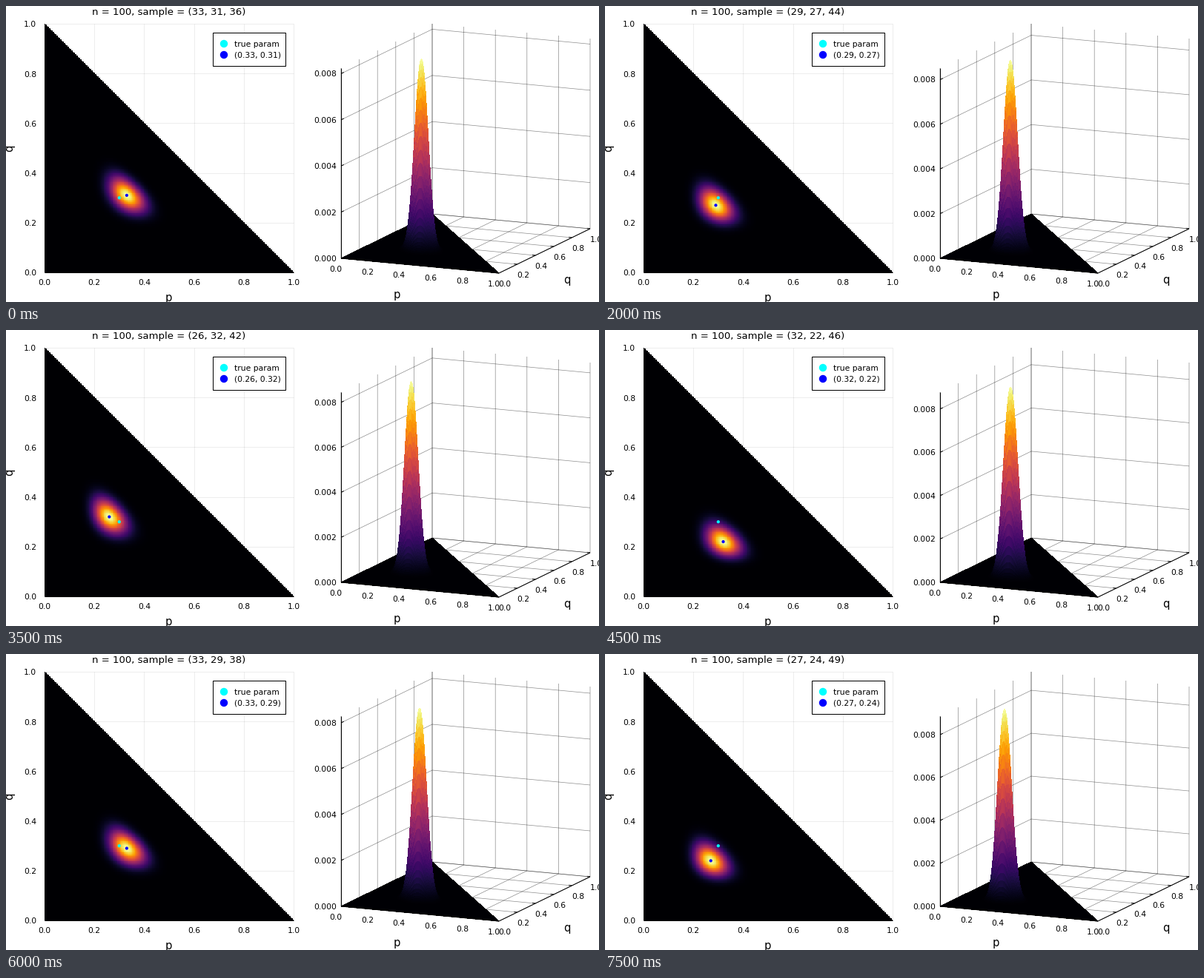
A matplotlib script that plays this animation: 800x400 px, repeating every 8 s.

```python
import math

import matplotlib.pyplot as plt
import numpy as np
from matplotlib.animation import FuncAnimation
from matplotlib.collections import PolyCollection
from matplotlib.patches import Circle, Polygon, Rectangle

W, H, DPI = 800, 400, 100
PX = 72 / DPI
plt.rcParams["font.family"] = "DejaVu Sans"

# Multinomial samples of size 100, one per frame
SAMPLES = [
    (33, 31), (29, 26), (33, 28), (30, 28), (29, 27), (31, 31), (33, 32), (26, 32),
    (30, 27), (32, 22), (34, 31), (35, 32), (33, 29), (28, 26), (31, 28), (27, 24),
]
N = 100
TRUE = (0.3, 0.3)
CELLS = 200
TICK, TITLE, LABEL = 10.8, 13.2, 14.7
CMAP = plt.get_cmap("inferno")

idx = np.arange(CELLS + 1)
P, Q = np.meshgrid(idx / CELLS, idx / CELLS)
INSIDE = idx[None, :] + idx[:, None] <= CELLS
R = np.clip(1 - P - Q, 0, 1)

# Flat panel
X0, Y0, SIDE = 52, 360, 336
# Orthographic box: base corner, p and q directions, height
ORIGIN = np.array([452.0, 341.0])
P_DIR = np.array([213.0, 20.0])
Q_DIR = np.array([123.0, -60.0])
BOX_H = 257


def likelihood(a, b):
    c = N - a - b
    log_coef = math.lgamma(N + 1) - sum(math.lgamma(k + 1) for k in (a, b, c))
    return math.exp(log_coef) * P**a * Q**b * R**c


def flat(p, q):
    return X0 + SIDE * p, Y0 - SIDE * q


def project(p, q, h=0.0):
    """Screen position of a point in the box, h in 0..1."""
    x = ORIGIN[0] + P_DIR[0] * p + Q_DIR[0] * q
    y = ORIGIN[1] + P_DIR[1] * p + Q_DIR[1] * q - BOX_H * h
    return x, y


fig = plt.figure(figsize=(W / DPI, H / DPI), dpi=DPI, facecolor="white")
ax = fig.add_axes([0, 0, 1, 1])
ax.axis("off")


def line(*pts, color="black", alpha=1.0, lw=1.0, z=4):
    xs, ys = zip(*pts)
    return ax.plot(xs, ys, color=color, alpha=alpha, lw=lw * PX, zorder=z,
                   solid_capstyle="butt")[0]


def text(x, y, s, px=TICK, ha="center", z=6, **kw):
    """Text whose digits are centred on y."""
    return ax.text(x, y + 0.365 * px, s, fontsize=px * PX, ha=ha, va="baseline",
                   zorder=z, **kw)


def dot(xy, r, color, z):
    patch = Circle(xy, r, fc=color, ec="none", zorder=z)
    ax.add_patch(patch)
    return patch


# --- flat panel ---
half = SIDE / CELLS / 2
heat = ax.imshow(np.zeros((CELLS + 1, CELLS + 1, 4)), origin="lower", aspect="auto",
                 interpolation="nearest", zorder=2,
                 extent=(X0 - half, X0 + SIDE + half, Y0 + half, Y0 - SIDE - half))
ax.set_xlim(0, W)
ax.set_ylim(H, 0)
heat.set_clip_path(Rectangle((X0, Y0 - SIDE), SIDE, SIDE, transform=ax.transData))

for k in range(6):
    t = k / 5
    line(flat(t, 0), flat(t, 1), alpha=0.1, lw=0.7, z=1)
    line(flat(0, t), flat(1, t), alpha=0.1, lw=0.7, z=1)
    text(flat(t, 0)[0], 373, f"{t:.1f}")
    text(41, flat(0, t)[1] + 0.5, f"{t:.1f}", ha="right")
line(flat(0, 0), flat(1, 0))
line(flat(0, 0), flat(0, 1))

title = text(220, 7.5, "", TITLE)
text(219.5, 393.3, "p", LABEL)
ax.text(8.5, 192, "q", fontsize=LABEL * PX, rotation=90, ha="right", va="center",
        zorder=6).set_position((12, 192))

dot(flat(*TRUE), 2.1, "cyan", 4.5)
marker = dot((0, 0), 2.1, "blue", 4.6)

ax.add_patch(Rectangle((279, 36), 98, 45, fc="white", ec="black", lw=PX, zorder=5))
dot((294, 51), 5.2, "cyan", 6)
dot((294, 66), 5.2, "blue", 6)
text(308, 51, "true param", ha="left")
legend = text(308, 66, "", ha="left")

# --- box ---
GRID = dict(alpha=0.45, lw=0.7, z=1)
for k in range(6):
    t = k / 5
    line(project(1, t), project(0, t), project(0, t, 1), **GRID)
    line(project(t, 0), project(t, 1), project(t, 1, 1), **GRID)
    line(project(1, t), project(0.98, t))
    text(445 + 42.6 * k, 355 + 4 * k, f"{t:.1f}")
    text(673 + 24.6 * k, 375 - 12 * k, f"{t:.1f}")
text(527, 390, "p", LABEL)
text(757, 370, "q", LABEL)

ax.add_patch(Polygon([project(0, 0), project(1, 0), project(0, 1)], fc=CMAP(0),
                     ec="none", antialiased=False, zorder=2))
line(project(0, 0), project(1, 0))
line(project(1, 0), project(1, 1))
line(project(0, 0), project(0, 0, 1))

Z_TICKS = [0.002 * k for k in range(5)]
z_grid = [line((0, 0), (0, 0), (0, 0), **GRID) for _ in Z_TICKS]
z_marks = [line((0, 0), (0, 0)) for _ in Z_TICKS]
z_text = [text(446, 0, f"{v:.3f}", ha="right") for v in Z_TICKS]

surface = PolyCollection([], antialiaseds=False, linewidths=0.4 * PX, zorder=3)
ax.add_collection(surface, autolim=False)


def corners(a):
    return np.stack([a[:-1, :-1], a[:-1, 1:], a[1:, 1:], a[1:, :-1]], axis=-1)


CELL_P, CELL_Q = corners(P), corners(Q)
CELL_OK = corners(INSIDE).all(axis=-1)
DEPTH = project(CELL_P.mean(axis=-1), CELL_Q.mean(axis=-1))[1]


def draw_surface(h):
    cell_h = corners(h)
    keep = CELL_OK & (cell_h.max(axis=-1) > 0.001)
    order = np.argsort(DEPTH[keep])
    x, y = project(CELL_P[keep], CELL_Q[keep], cell_h[keep])
    colors = CMAP(cell_h[keep].mean(axis=-1)[order])
    surface.set_verts(np.stack([x, y], axis=-1)[order])
    surface.set_facecolor(colors)
    surface.set_edgecolor(colors)


def update(i):
    a, b = SAMPLES[i]
    f = likelihood(a, b)
    top = f[INSIDE].max()
    h = f / top

    rgba = CMAP(h)
    rgba[~INSIDE, 3] = 0
    heat.set_data(rgba)
    draw_surface(h)

    title.set_text(f"n = {N}, sample = ({a}, {b}, {N - a - b})")
    legend.set_text(f"({a / N:.2f}, {b / N:.2f})")
    marker.center = flat(a / N, b / N)

    for v, grid, mark, label in zip(Z_TICKS, z_grid, z_marks, z_text):
        pts = [project(p, q, v / top) for p, q in ((0, 0), (0, 1), (1, 1))]
        grid.set_data(*zip(*pts))
        mark.set_data(*zip(pts[0], project(0, 0.03, v / top)))
        label.set_y(pts[0][1] + 0.365 * TICK)
    return []


anim = FuncAnimation(fig, update, frames=len(SAMPLES), init_func=lambda: [],
                     interval=500, repeat=True, repeat_delay=0, blit=False)
plt.show()
```
